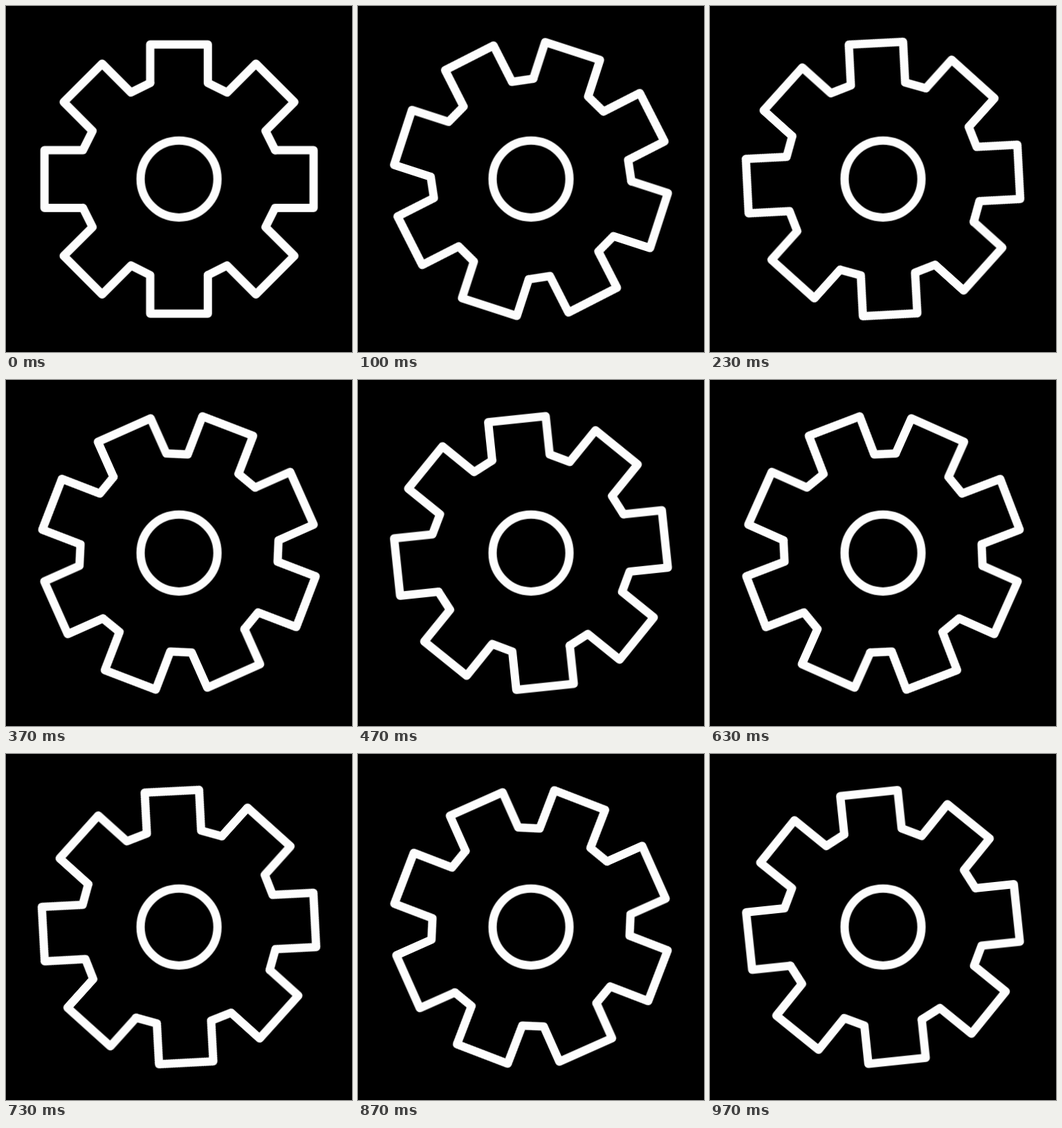
An HTML page for the animation above (1010 ms loop, 500 by 500 pixels).

```html
<!DOCTYPE html>
<html lang="en">
<head>
<meta charset="utf-8">
<title>Spinning gear</title>
<style>
  html, body { margin: 0; width: 100%; height: 100%; overflow: hidden; background: #000; }
  svg { display: block; width: 100%; height: 100%; }
  .line { fill: none; stroke: #fdfdfd; stroke-width: .432; stroke-linejoin: round; stroke-linecap: round; }

  /* 6deg ticks, 30 per second; the last one is held until the loop ends */
  .gear {
    transform-origin: 0 0;
    animation: spin 1010ms steps(29) -3.5ms infinite;
  }
  @keyframes spin {
    0% { transform: rotate(0deg); }
    95.71%, 100% { transform: rotate(174deg); }
  }
</style>
</head>
<body>
<svg viewBox="0 0 18 18">
  <defs>
    <!-- one straight and one diagonal tooth -->
    <polyline id="quarter" points="-1.5,-5 -1.5,-7 1.5,-7 1.5,-5 2.5,-4.5 4,-6 6,-4 4.5,-2.5 5,-1.5"/>
  </defs>
  <g class="line" transform="translate(9 9)">
    <g class="gear">
      <use href="#quarter"/>
      <use href="#quarter" transform="rotate(90)"/>
      <use href="#quarter" transform="rotate(180)"/>
      <use href="#quarter" transform="rotate(270)"/>
    </g>
    <circle r="2"/>
  </g>
</svg>
</body>
</html>
```
